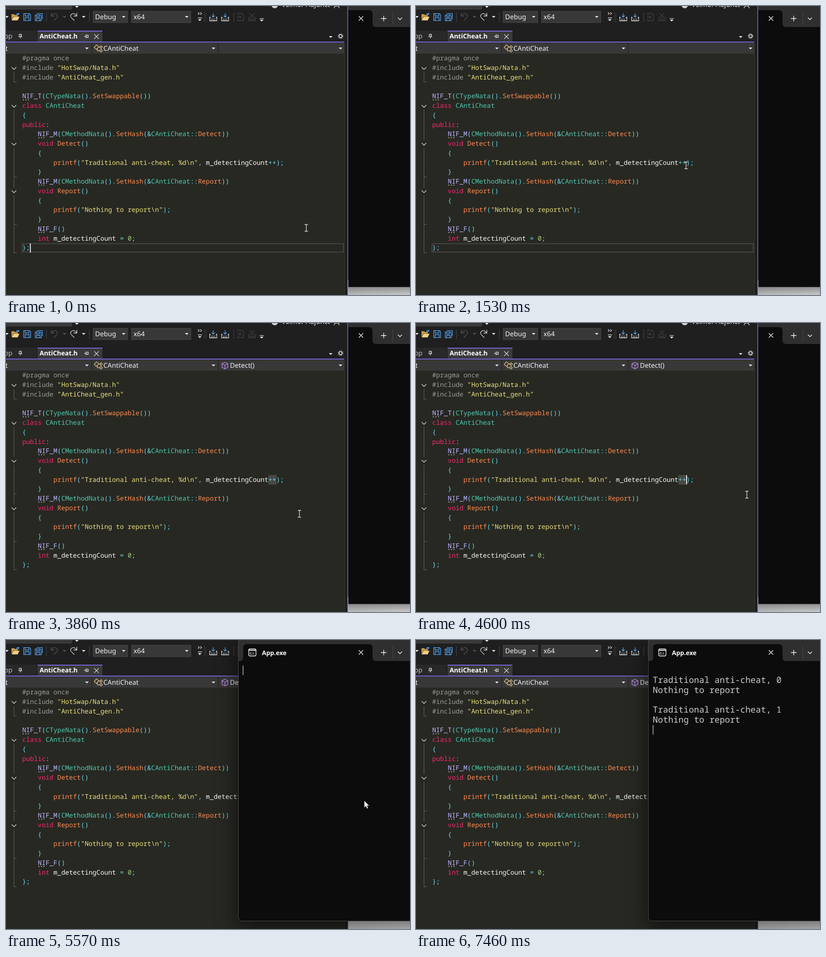
An HTML page for the animation above (8000 ms loop, 884 by 633 pixels).

```html
<!DOCTYPE html>
<html lang="en">
<head>
<meta charset="utf-8">
<title>Code editor and console</title>
<style>
  html, body { margin: 0; width: 100%; height: 100%; overflow: hidden; background: #1f1f1f; }
  svg { display: block; width: 884px; height: 633px; }
  text { white-space: pre; text-rendering: geometricPrecision; }
  .ui { font: 14.7px "Noto Sans", "Open Sans", sans-serif; fill: #f2f2f2; }
  .bold { font-weight: 600; font-size: 14px; fill: #fff; }
  .code { font: 500 14.25px "Noto Sans Mono", monospace; }
  .console { font: 500 18.8px "Noto Sans Mono", monospace; fill: #ccc; }
  .line { fill: none; stroke: #d6d6d6; stroke-width: 1.3; }
  .blue { stroke: #55aaff; }
  .dim { stroke: #555; }
  .off { stroke: #424242; }
  .combo { fill: #383838; stroke: #474747; }
  .window { filter: drop-shadow(0 7px 14px rgba(0, 0, 0, .5)); }
  .front .window { filter: drop-shadow(0 14px 24px rgba(0, 0, 0, .6)); }
</style>
</head>
<body>
<svg viewBox="0 0 884 633">
  <defs>
    <clipPath id="behind"><rect x="749" width="135" height="633"/></clipPath>
    <linearGradient id="desk"><stop stop-color="#d2d2d2"/><stop offset="1" stop-color="#e2e2e2"/></linearGradient>
    <g id="save"><path d="M.7.7h12.6l2.5 2.5v12.6H.7zM4 1v5h8V1M4 15.500V9.500h8.500v6"/></g>
    <g id="build">
      <path class="line" d="M.7 7.500v9h15.600v-9M4 12.500h1.500m2 0h1.500m2 0h1.500M4 15h1.500m2 0h1.500m2 0h1.500M1 9.500h2m11 0h2"/>
      <path class="line blue" stroke-width="1.800" d="M8.500 0v8M5 5l3.500 3.500L12 5"/>
    </g>
    <g id="pin"><path class="line" d="M0 4h4M4 0v8M4 1.500h5v4.500H4M4 5.500h5"/></g>
  </defs>

  <rect width="748" height="633" fill="#1f1f1f"/>
  <rect x="748" y="600" width="136" height="33" fill="url(#desk)"/>

  <g id="toolbar">
    <rect class="combo" x="-8" y="-20" width="152" height="27" rx="2"/>
    <text class="ui" x="603" y="2">Velmor Adjunct</text>
    <circle cx="588" cy="-2" r="7" fill="#d0d0d0"/>
    <path class="line" d="M718 5q0-5 5.500-5t5.500 5"/>
    <path d="M12 18h6l2 2h6v3h-10l-4 8z" fill="#c99b45"/>
    <path d="M12.500 31.500l4-8h13l-4 8z" fill="#f3cf86"/>
    <path class="line blue" d="M22 19q4-4 6-1m0-3v3.500h-3.500"/>
    <use class="line blue" href="#save" x="38" y="16"/>
    <path class="line blue" d="M67 16.700h12.500V29M64 19.700h11l2 2V32.300H64zM67 20v4h6v-4M67 32v-5h7v5"/>
    <path class="line dim" d="M99 15v7h7M99.500 21.500q5-7 10.500-4 6 5-1 10l-4.500 4.500"/>
    <path class="line" d="M155 15v7h-7M154.500 21.500q-5-7-10.500-4-6 5 1 10l4.500 4.500"/>
    <path class="line off" d="M88.500 14v21M182.500 14v21M498.500 14v21"/>
    <rect class="combo" x="190.500" y="11.500" width="76" height="25"/>
    <rect class="combo" x="274.500" y="11.500" width="130" height="25"/>
    <text class="ui" x="195" y="29">Debug</text>
    <text class="ui" x="279" y="29">x64</text>
    <path class="line" d="M420 14l3 2.500-3 2.500m5-5l3 2.500-3 2.500M420 26h9"/>
    <path class="line dim" stroke-dasharray="2 2.500" d="M434 14v21M437 16v19"/>
    <use href="#build" x="445" y="16"/>
    <use href="#build" x="471" y="16"/>
    <path class="line off" d="M507 20v-4h9l4 4v12h-13v-4M505 24h9m-3-3l3 3-3 3M531 24v8h15v-8M533 16l10 10m0-10L533 26M534 29h9"/>
    <path class="line" d="M555 27.500h9"/>
  </g>

  <g id="tabs">
    <rect y="54" width="67" height="24" fill="#282828"/>
    <rect x="69" y="54" width="142" height="25" fill="#3a3a3a"/>
    <path d="M69 54h142v2H69zM0 78h740v2H0z" fill="#7466dc"/>
    <text class="ui" x="-4" y="71" style="fill:#bbb">pp</text>
    <use href="#pin" transform="translate(27.500 71) rotate(-90)"/>
    <text class="ui bold" x="73.500" y="71">AntiCheat.h</text>
    <use href="#pin" x="171" y="62.500"/>
    <path class="line" d="M193 62l10 10m0-10l-10 10"/>
    <circle class="line" cx="732" cy="66" r="3"/>
    <circle class="line" cx="732" cy="66" r="4.800" style="stroke-width:2" stroke-dasharray="1.900 1.870"/>
    <rect y="80" width="740" height="25" fill="#2c2c2c"/>
    <path d="M0 81h186v23H0zM189 81h274v23H189zM466 81h274v23H466z" fill="#383838"/>
    <text class="ui" x="-1.500" y="98">t</text>
    <path class="line" style="stroke:#e0bd82" d="M198 85l5 4-5 6-5-4zM203 90h4M200 93v5h5M208 87l3 3-3 3-3-3zM208 95l3 3-3 3-3-3z"/>
    <text class="ui" x="213" y="98">CAntiCheat</text>
    <g id="member">
      <path class="line" style="stroke:#b48ad8;fill:#453a50" d="M479 86l6.500 3v8l-6.500 3.500-6.500-3.500v-8zM472.500 89l6.500 3.500 6.500-3.500M479 92.500v8"/>
      <text class="ui" x="490" y="98">Detect()</text>
    </g>
  </g>

  <g id="editor">
    <rect y="105" width="740" height="528" fill="#272822"/>
    <path d="M740.500 80v553" stroke="#3a3a3a"/>
    <rect id="border" x="747" width="1.500" height="633"/>
    <path class="line" style="stroke:#686868;stroke-width:1" d="M17.500 145v21.500h6M17.500 227v66M17.500 311v87M17.500 415v125.500h6M17.500 374.500h6M17.500 478.500h6"/>
    <rect id="currentLine" x="35" width="703" height="18.500" fill="none" stroke="#454545" stroke-width="2"/>
    <rect id="selection" x="574" y="333" width="18" height="21" fill="#484944"/>
    <g id="code" class="code"></g>
    <rect id="caret" width="1.800" height="20" fill="#fff"/>
  </g>
  <g id="arrows" fill="#e6e6e6"></g>

  <g id="terminal">
    <rect class="window" x="508.500" y="-10" width="500" height="625.500" rx="8" fill="#0c0c0c" stroke="#4c4c4c"/>
    <path d="M509 0h375v46H509z" fill="#2f2f2f"/>
    <path d="M511 46q8 0 8-8V17q0-8 8-8h267q8 0 8 8v21q0 8 8 8z" fill="#0c0c0c"/>
    <rect class="line" x="531" y="19.500" width="16" height="15.500" rx="3" style="stroke:#fff"/>
    <path d="M531 22.500h16" stroke="#fff" stroke-width="2"/>
    <text x="533" y="31.500" font-family="Liberation Sans, sans-serif" font-weight="700" font-size="7" fill="#fff">C:\</text>
    <text class="ui bold" x="560" y="33" style="font-size:13.600px">App.exe</text>
    <path class="line" style="stroke:#fff" d="M772 22.500l9.500 9.500m0-9.500L772 32M820.500 27.500h12M826.500 21.500v12M857.500 25.500l4.500 4.500 4.500-4.500"/>
    <path d="M846.500 13v28" stroke="#484848"/>
    <g id="output" class="console"></g>
    <rect id="prompt" x="518" width="1.300" height="21" fill="#ccc"/>
  </g>

  <g id="mouse">
    <path id="arrow" d="M0 0v15.200l3.500-3.300 2.600 5.500 2.400-1.100-2.600-5.300h4.800z" fill="#fff" stroke="#111" stroke-width=".5"/>
    <path id="beam" class="line" style="stroke:#e4e4e4" d="M-3.500-7.500h2.500q1 0 1 1v13q0 1-1 1h-2.500M3.500-7.500h-2.500q-1 0-1 1v13q0 1 1 1h2.500"/>
  </g>
</svg>

<script>
const LOOP = 8000;
const $ = id => document.getElementById(id);

const LEFT = 35.4, CHAR = 8.55, ROW = 20.75, TOP = 104.5;
const source = String.raw`#pragma once
#include "HotSwap/Nata.h"
#include "AntiCheat_gen.h"

NIF_T(CTypeNata().SetSwappable())
class CAntiCheat
{
public:
    NIF_M(CMethodNata().SetHash(&CAntiCheat::Detect))
    void Detect()
    {
        printf("Traditional anti-cheat, %d\n", m_detectingCount++);
    }
    NIF_M(CMethodNata().SetHash(&CAntiCheat::Report))
    void Report()
    {
        printf("Nothing to report\n");
    }
    NIF_F()
    int m_detectingCount = 0;
};`.split('\n');

const tokens = [
  ['"[^"]*"', '#ebe07a'],
  ['#\\w+(?: once)?', '#9b9b9b'],
  ['NIF_\\w', '#beb7ff'],
  ['m_\\w+', '#f8f8f2'],
  ['printf|SetSwappable|SetHash|Detect|Report', '#ff8b4f'],
  ['CTypeNata|CMethodNata|CAntiCheat', '#4ec9b0'],
  ['class|public|void|int', '#f92672'],
  ['\\d', '#a6ce80'],
  ['[^\\w"#]+', '#66d9ef']
];
const lexer = new RegExp(tokens.map(([rule]) => `(${rule})`).join('|'), 'g');
const escape = s => s.replace(/&/g, '&amp;').replace(/</g, '&lt;');

$('code').innerHTML = source.map((line, row) => {
  const body = line.trimStart();
  const x = LEFT + (line.length - body.length) * CHAR;
  const y = TOP + row * ROW + 14.9;
  const spans = [...body.matchAll(lexer)].map(m => {
    const kind = m.slice(1).findIndex(g => g !== undefined);
    return `<tspan fill="${tokens[kind][1]}">${escape(m[0])}</tspan>`;
  }).join('');
  const hint = body.startsWith('NIF')
    ? `<path d="M${x + 1.5} ${y + 3.2}h13" stroke="#bbb" stroke-width="2" stroke-dasharray="2 3.5"/>` : '';
  return `<text x="${x}" y="${y}">${spans}</text>${hint}`;
}).join('') + [136, 219, 302, 406].map(y =>
  `<path class="line" d="M12.500 ${y - 2}l5 5 5-5"/>`).join('');

$('arrows').innerHTML = [[155, 2], [2, 24], [128, 24, 1], [170, 24], [257.5, 24], [395.5, 24], [424, 31],
  [559.5, 32], [710.5, 68], [177, 93], [454, 93], [732, 93]]
  .map(([x, y, dim]) => `<path d="M${x - 4} ${y - 2}h8l-4 4z" ${dim ? 'fill="#555"' : ''}/>`).join('');

const CONSOLE_ROW = 21.67;
const consoleLine = (row, words) =>
  `<text x="518" y="${94 + (row - 1) * CONSOLE_ROW}">${words}</text>`;
$('output').innerHTML = [0, 1].map(n => '<g>' +
  consoleLine(1 + 3 * n, `Traditional anti-cheat, ${n}`) +
  consoleLine(2 + 3 * n, 'Nothing to report') + '</g>').join('');
const [firstRun, secondRun] = $('output').children;

// time, x, y
const mousePath = [[0, 657, 486], [530, 657, 486], [1040, 617, 405], [1300, 589, 358],
  [1400, 589, 358], [1530, 590.5, 349], [2319, 590.5, 349], [2320, 587, 354.5], [2340, 587, 354.5],
  [2590, 622, 429], [3680, 622, 429], [3860, 642, 418], [4360, 703.5, 384],
  [4460, 703.5, 384], [5020, 784, 352], [LOOP, 784, 352]];
// time, visible
const caretBlink = [[0, 1], [160, 0], [690, 1], [1220, 0], [1850, 1], [2590, 0],
  [3100, 1], [3620, 0], [4140, 1], [4660, 0], [5530, 1], [5570, 0]];
// time, visible, row
const promptSteps = [[0, 0, 0], [5570, 1, 0], [6130, 0, 0], [6610, 1, 1], [6690, 1, 3],
  [7320, 0, 3], [7370, 1, 4], [7420, 0, 6], [7460, 1, 6]];

const stepAt = (table, t) => table.findLast(step => step[0] <= t);

function along(path, t) {
  const i = path.findIndex(key => key[0] > t);
  const [t0, x0, y0] = path[i - 1], [t1, x1, y1] = path[i];
  const k = (t - t0) / (t1 - t0);
  return [x0 + (x1 - x0) * k, y0 + (y1 - y0) * k];
}

const show = (el, on) => el.style.display = on ? '' : 'none';

function draw(t) {
  const clicked = t >= 1850, selected = t >= 2070, consoleFront = t >= 5570;
  const row = clicked ? 11 : 20;

  $('currentLine').setAttribute('y', TOP + row * ROW + 1);
  show($('currentLine'), !selected);
  show($('selection'), selected);
  show($('member'), clicked);
  $('caret').setAttribute('x', clicked ? 591.2 : 52.4);
  $('caret').setAttribute('y', TOP + row * ROW + .5);
  show($('caret'), stepAt(caretBlink, t)[1]);

  $('border').setAttribute('fill', consoleFront ? '#3a3a3a' : '#7466dc');
  $('terminal').setAttribute('clip-path', consoleFront ? 'none' : 'url(#behind)');
  $('terminal').classList.toggle('front', consoleFront);
  const [, visible, promptRow] = stepAt(promptSteps, t);
  $('prompt').setAttribute('y', 56 + promptRow * CONSOLE_ROW);
  show($('prompt'), visible);
  show(firstRun, t >= 6690);
  show(secondRun, t >= 7420);

  const [x, y] = along(mousePath, t);
  const pointing = (selected && t < 2365) || x > 740;
  $('mouse').setAttribute('transform', `translate(${Math.round(x)} ${Math.round(y)})`);
  show($('mouse'), t < 6610);
  show($('arrow'), pointing);
  show($('beam'), !pointing);
}

const start = performance.now();
function tick() {
  draw((performance.now() - start) % LOOP);
  requestAnimationFrame(tick);
}
tick();
</script>
</body>
</html>
```
